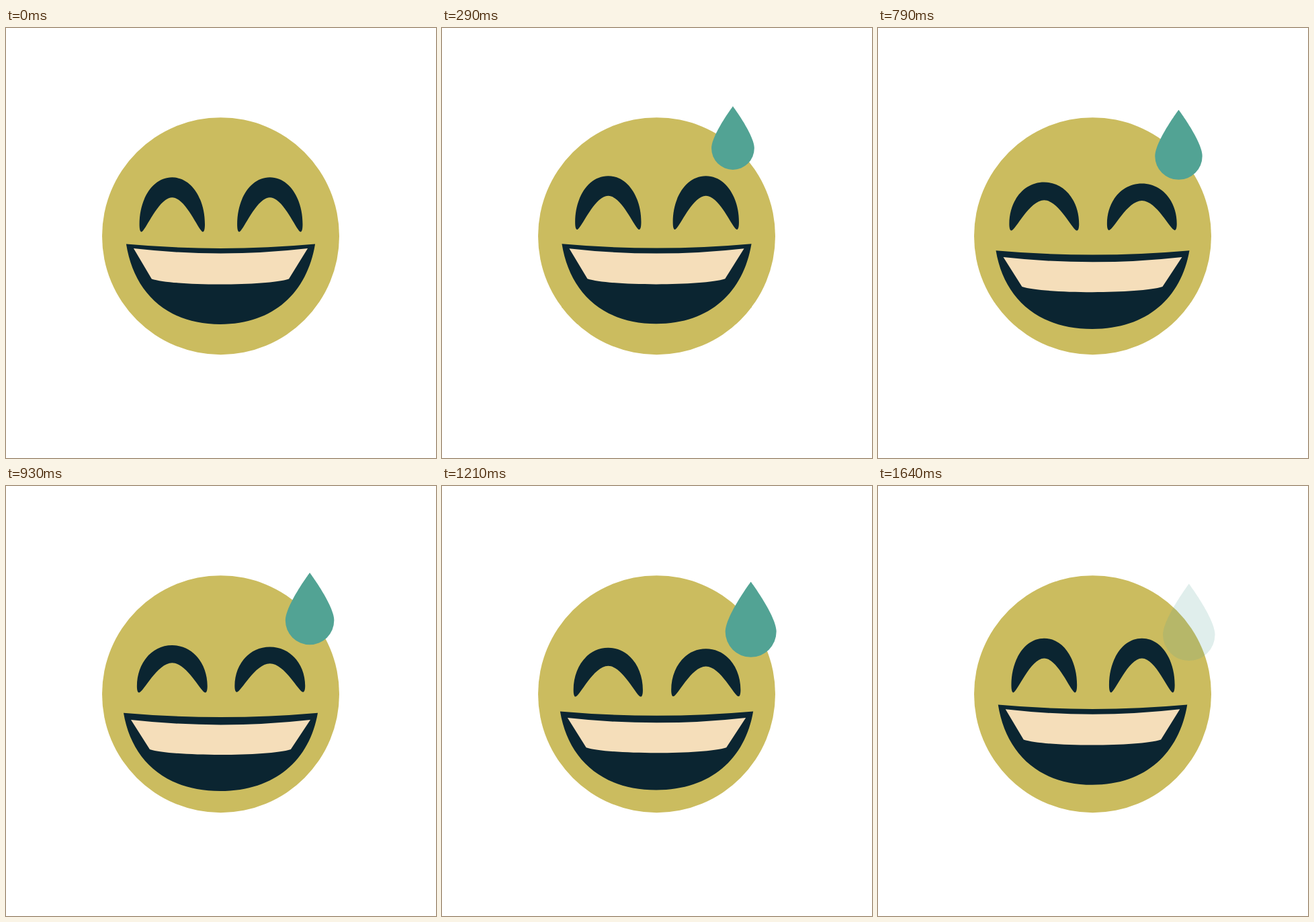
Animation of 640 by 640 pixels, one loop 1710 ms. Source, as an HTML page:

```html
<!DOCTYPE html>
<html lang="en">
<head>
<meta charset="utf-8">
<title>Nervous laugh</title>
<style>
  html, body { margin: 0; width: 100%; height: 100%; overflow: hidden; background: #fff; }
  svg { display: block; width: 100%; height: 100%; }
</style>
</head>
<body>
<svg viewBox="0 0 640 640">
  <circle cx="319.5" cy="309.7" r="176.5" fill="#cbbc5f"/>
  <g fill="#0b2531">
    <path id="eyeL"/>
    <path id="eyeR"/>
    <path id="mouth"/>
  </g>
  <path id="teeth" fill="#f5deba"/>
  <path id="drop" fill="#52a394"
    d="M0 0C0 0 38.7 52 38.7 75.8A38.7 38.7 0 0 1 -38.7 75.8C-38.7 52 0 0 0 0Z"/>
</svg>
<script>
const LOOP = 1710, STEPS = 24;

const el = id => document.getElementById(id);
const setPath = (id, d) => el(id).setAttribute("d", d);

// Eased 0 to 1 between two steps
function ease(f, from, to) {
  const x = Math.min(1, Math.max(0, (f - from) / (to - from)));
  return x * x * (3 - 2 * x);
}

// Eased 0 to 1 and back to 0
const bump = (f, from, peak, to) => ease(f, from, peak) * (1 - ease(f, peak, to));

function drawEye(id, cx, top, arch, base, half) {
  const x = k => cx + k * half;
  const y = k => top + k * (base - top);
  setPath(id, `M${x(-.94)} ${base}
    C${x(-.82)} ${base} ${x(-.42)} ${arch} ${cx} ${arch}
    S${x(.82)} ${base} ${x(.94)} ${base}
    C${x(.99)} ${base} ${x(1)} ${y(.92)} ${x(1)} ${y(.86)}
    C${x(1)} ${y(.4)} ${x(.6)} ${top} ${cx} ${top}
    S${x(-1)} ${y(.4)} ${x(-1)} ${y(.86)}
    C${x(-1)} ${y(.92)} ${x(-.99)} ${base} ${x(-.94)} ${base}Z`);
}

function drawEyes(f, squash, sink) {
  const lift = f < 13 ? ease(f, 0, 13) : ((STEPS - f) / 11) ** 2;
  const base = 303.4 + sink - 15 * lift;
  const top = base - 81.1 + 10.8 * squash;
  const arch = top + 30 - 3.8 * squash;
  const half = 48.7 + 3.8 * squash;
  const tilt = 2.6 * squash * squash;
  drawEye("eyeL", 247.3, top, arch, base, half);
  drawEye("eyeR", 392.8, top + tilt, arch + tilt * .4, base - tilt * .3, half);
}

function drawMouth(squash, sink) {
  const c = 319.5, low = c - .6;
  const w = 140.6 + 4 * squash;
  const top = 321.6 + sink - 3 * squash;
  const base = top + 119.4 - 3.2 * squash;
  const side = top + (base - top) * .6;
  setPath("mouth", `M${c - w} ${top} Q${c} ${top + 12.6} ${c + w} ${top}
    C${low + w * .92} ${side} ${low + w * .57} ${base} ${low} ${base}
    S${low - w * .915} ${side} ${c - w} ${top}Z`);

  const a = w - 11, b = w * .726, k = w * .49;
  const t = top + 6.5 + 3.8 * squash, u = t + 45.3 - 1.4 * squash;
  setPath("teeth", `M${c - a} ${t} Q${c} ${t + 14.8} ${c + a} ${t}
    L${low + b} ${u} C${low + k} ${u + 10.8} ${low - k} ${u + 10.8} ${low - b} ${u}Z`);
}

function drawDrop(f) {
  const left = 1 - ease(f, 0, 21);
  const x = 462.8 - 33 * left;
  const y = 112.6 + 8 * (1 - ease(f, 0, 8)) + 33 * ease(f, 6.5, 19.5);
  const fade = bump(f, 0, 3.7, STEPS) && ease(f, 0, 3.7) * ease(STEPS - f, 0, 3.7);
  el("drop").setAttribute("transform", `translate(${x} ${y}) scale(${1 - .195 * left})`);
  el("drop").setAttribute("opacity", fade);
}

function draw(f) {
  const squash = bump(f, 0, 14, 25) ** 1.3;
  const sink = 19.5 * bump(f, 7.5, 13.5, 27);
  drawEyes(f, squash, sink);
  drawMouth(squash, sink);
  drawDrop(f);
}

const start = performance.now();
function tick(now) {
  const t = Math.max(0, now - start) % LOOP;
  draw(Math.floor((t + 3) / LOOP * STEPS) % STEPS);
  requestAnimationFrame(tick);
}
draw(0);
requestAnimationFrame(tick);
</script>
</body>
</html>
```
